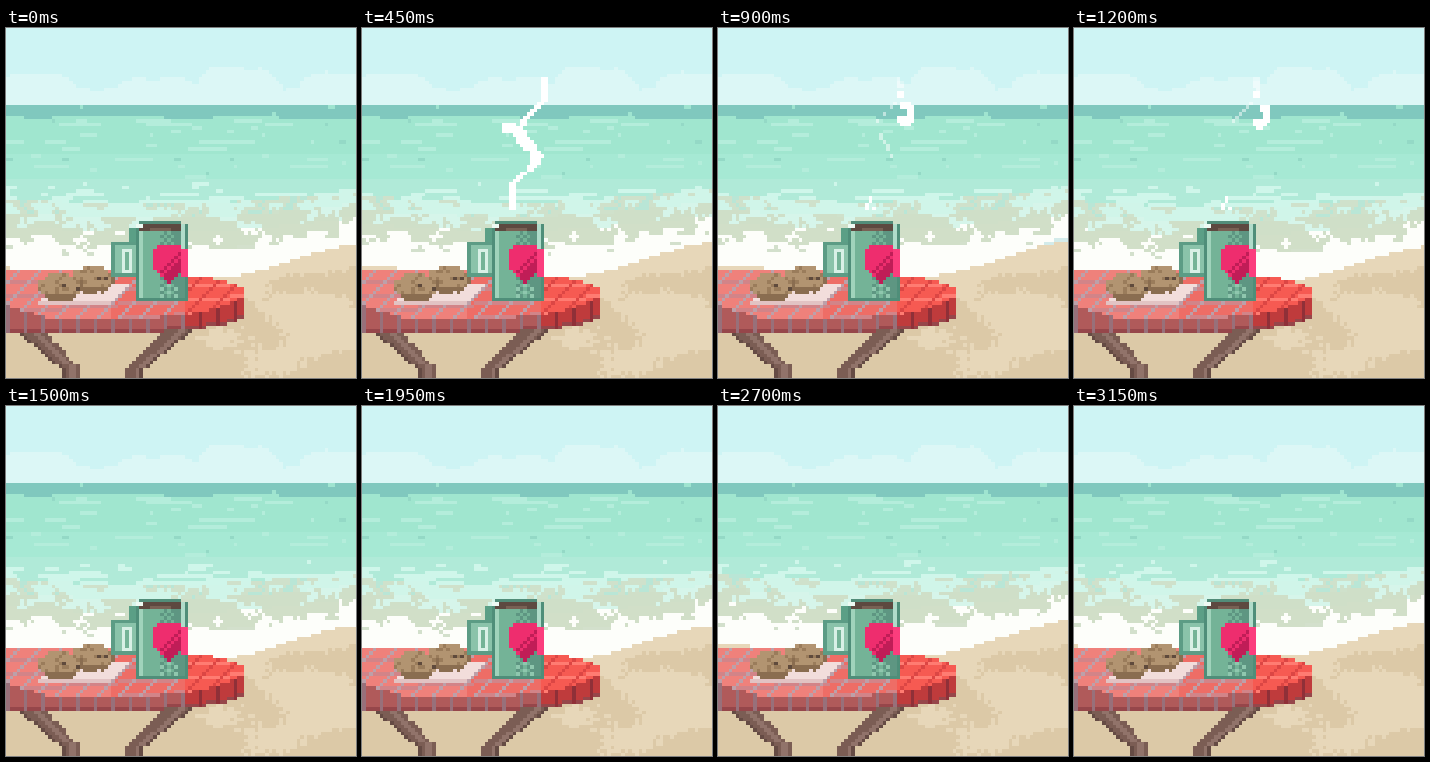
Animation, 350 px wide and 350 px high, one loop 3.3 s. Source, as an HTML page with a canvas:

```html
<!DOCTYPE html>
<html lang="en">
<head>
<meta charset="utf-8">
<title>Coffee on the beach</title>
<style>
html, body { margin: 0; width: 100%; height: 100%; overflow: hidden; background: #cef4f4; }
canvas { display: block; width: 350px; height: 350px; image-rendering: pixelated; }
</style>
</head>
<body>
<canvas id="stage" width="350" height="350"></canvas>
<script>
const N = 100, STEP = 150, LOOP = 3300;
const stage = document.getElementById('stage').getContext('2d');
const grid = document.createElement('canvas');
grid.width = grid.height = N;
const g = grid.getContext('2d');
stage.imageSmoothingEnabled = false;

function px(x, y, w, h, c) {
  g.fillStyle = c;
  g.fillRect(Math.round(x), Math.round(y), w, h);
}

function paint(x0, y0, x1, y1, pick) {
  for (let y = y0; y < y1; y++) for (let x = x0; x < x1; x++) {
    const c = pick(x, y);
    if (c) px(x, y, 1, 1, c);
  }
}

const clamp = v => Math.max(0, Math.min(1, v));
const smooth = v => (v = clamp(v), v * v * (3 - 2 * v));

function hash(x, y) {
  let n = Math.imul(x + 11, 374761393) + Math.imul(y + 7, 668265263);
  n = Math.imul(n ^ (n >>> 13), 1274126177);
  return ((n ^ (n >>> 16)) >>> 0) / 4294967296;
}

// Noise stretched sideways, so it reads as short horizontal dashes.
function dash(x, y, len) {
  const p = x / len + hash(y, 91) * 5, i = Math.floor(p), f = p - i;
  return hash(i, y) * (1 - f) + hash(i + 1, y) * f;
}

function blotch(x, y, w, h) {
  const i = Math.floor(y / h), f = y / h - i;
  return dash(x, i, w) * (1 - f) + dash(x, i + 1, w) * f;
}

// The wave runs in, pulls back, rests and returns.
function tideAt(t) {
  const ease = (a, b) => smooth((t - a) / (b - a));
  return -ease(150, 700) + 1.8 * ease(800, 1250) - 1.8 * ease(1950, 2400) + ease(2500, 2900);
}

const shoreAt = x => Math.min(68 + x * .06, 71 - 10 * smooth((x - 58) / 45));
const foamAt = x => 61 + 3 * Math.sin(Math.PI * x / N) - .025 * x;

function sky(x, y) {
  const hump = (c, w, h) => h * (1 - ((x - c) / w) ** 4);
  const rise = Math.max(hump(8, 13, 7), hump(43, 14, 5), hump(66, 14, 8), hump(95, 13, 7), 2);
  return y >= 19.5 - rise - hash(x >> 2, 5) * 1.5 ? '#dcf7f6' : '#cef4f4';
}

function deepWater(x, y) {
  const n = dash(x, y, 8);
  if (y < 25) return n > .93 ? '#9fe4d0' : '#80c8be';
  if (y === 25) return n > .5 ? '#a0e6cf' : '#80c8be';
  if (n > .84) return '#b4eddb';
  if (n < .07) return '#94d9c6';
  return y < 36 ? '#a0e6cf' : '#a6e9d4';
}

function sand(x, y) {
  const n = blotch(x, y, 16, 8) + (hash(x, y) - .5) * .14 + (y - 80) * .018;
  return n > .56 ? '#dcc9a7' : '#e7d7b9';
}

function surf(x, y, tide) {
  const left = shoreAt(x) + tide - y;
  if (left <= 0) return sand(x, y);
  if (left < 1 && x > 92 && tide < -.6) return '#d3ebea';
  const d = foamAt(x) + tide - y, row = y - Math.round(tide);
  const n = blotch(x, row, 4, 2) + (hash(x, row) - .5) * .25;
  if (d <= 0) return d > -2 && n < .3 ? '#d3e0cc' : '#fdfefa';
  if (d < 5) return n > .52 + .05 * d ? '#fdfefa' : '#d1dfc8';
  if (d < 9) return n > .72 ? '#d6f5ea' : '#cfdfc8';
  if (d < 13) return n > .5 ? '#d0f5e9' : n < .22 ? '#b9e6d6' : '#cfe1cb';
  const m = dash(x, row, 5);
  return m > 1.2 - (y - 41) * .1 ? '#cff6ea' : '#b0ead8';
}

function legs() {
  for (let y = 85; y < N; y++) {
    const k = Math.min(y - 86, 11), w = Math.round(8 - k * .25);
    for (const [x, edge] of [[3 + k * 1.15, 0], [45 - k, w - 1]]) {
      px(x, y, w, 1, '#7b5d54');
      px(x + w / 2, y, 2, 1, '#91736a');
      px(x + edge, y, 1, 1, '#654b44');
    }
  }
}

function cloth(x, y) {
  const r = x / 68;
  const hem = 82.5 - 7 * r ** 6 - Math.max(0, 12 - x) * .3;
  const foot = 86.3 - 4 * r ** 6;
  if (y < 68.7 + 5 * r ** 5 || y > foot) return null;
  const right = x > 50;
  if (y > hem) {
    if (x % 5 === 0) return right ? '#8f3038' : '#98707a';
    return y + 1 > foot ? '#96464a' : right ? '#bf3b3c' : '#b05a5a';
  }
  const across = (x + y) % 6 < 1, along = (y + (x >> 4)) % 4 === 0;
  if (right) return across ? '#dc4644' : along ? '#ff7c72' : '#f65a52';
  if (across) return '#bda0a9';
  return along ? '#d28488' : x < 30 ? '#ef817b' : '#ee6d66';
}

function napkin(x, y) {
  const slant = (79 - y) * 1.4;
  return x > 7 + slant && x < 29 + slant * .7 ? y > 77 ? '#e2c3c3' : '#f2dddb' : null;
}

function cookie(cx, cy) {
  paint(cx - 8, cy - 5, cx + 8, cy + 6, (x, y) => {
    const dx = (x - cx) / 6.6, dy = (y + .5 - cy) / 3.8, n = hash(x, y);
    if (dx * dx + dy * dy > .9 + n * .2) return null;
    if (dy > .6 || dx > .88) return '#8a6d50';
    return n > .91 ? '#5f4a3c' : n < .2 ? '#9a7c5b' : '#b29471';
  });
}

function mugBody(x, y) {
  if (x === 37 || x === 51 || y === 77) return '#4f8e79';
  if (x === 38) return '#a0d3bb';
  if (x === 50 && y < 64) return '#b0dcca';
  const shade = (x - 41) / 9;
  return shade > ((x + y) % 2 ? .3 : .75) ? '#5e9682' : '#74b397';
}

function heart(x, y) {
  const u = (x - 46) / 4.2, v = (67 - y) / 4.4;
  const q = u * u + v * v - 1;
  if (q ** 3 - u * u * v ** 3 > .05) return null;
  const dim = x - 46 + (y - 67) + (x + y) % 2 * 2 > 1;
  return dim ? '#c01d57' : '#ee2d6e';
}

function mug() {
  px(35, 57, 2, 5, '#5b9f86');
  px(30, 61, 7, 10, '#5c9c85');
  px(31, 62, 6, 8, '#8ac3aa');
  px(33, 63, 3, 7, '#d8f0e6');
  px(34, 64, 1, 5, '#74b397');
  paint(37, 56, 52, 78, mugBody);
  px(38, 55, 12, 1, '#528d79');
  px(38, 56, 12, 2, '#5d4940');
  px(41, 57, 6, 1, '#786154');
  px(37, 56, 2, 1, '#eefaf3');
  paint(41, 62, 51, 73, heart);
  px(50, 63, 2, 8, '#fb3d7d');
  paint(44, 73, 50, 77, (x, y) => (x + y * 2) % 4 < 1 ? '#8fc7ae' : null);
}

// Centre of the rising plume at height y.
function plume(y) {
  const sway = 3.2 * Math.min(1, (y - 13) / 10, (52 - y) / 12);
  return 43 + (51 - y) * .24 + sway * Math.sin((42 - y) * Math.PI / 10);
}

function steam(i) {
  if (i < 1 || i > 9) return;
  const white = '#fff', faint = 'rgba(255,255,255,.5)';
  const head = Math.max(14, 42 - 8 * i - (i > 2 ? 4 : 0));
  const tail = 51 - Math.max(0, i - 3) * 5;
  for (let y = head; y <= tail; y++) {
    const fat = 2 * Math.exp(-(((y - 36) / 4) ** 2));
    const w = i > 5 ? 1 : Math.round(1.6 + fat);
    if (i < 6 || hash(y, i) > .4) px(plume(y) - w / 2, y, w, 1, i < 6 ? white : faint);
  }

  // Side branch, folding back into the plume.
  if (i > 1 && i < 5) {
    for (let s = 0; s < 7 - (i - 2); s++) px(46 - s * .8, 33 - s, 2, 2, white);
    if (i < 4) px(40, 27, 4, 3, white);
  }

  // Curl that rolls up beside the head and fades.
  if (i > 3) {
    for (let a = -2.6 + (i - 4) * .4; a < 2.4; a += .3) {
      px(52 + 2 * Math.cos(a), 22.5 + (i - 4) * .4 + 2.5 * Math.sin(a), 2, 2, white);
    }
    px(51, 18, 2, i < 6 ? 3 : 2, white);
    px(51, 14, 1, 3, i < 6 ? white : faint);
    px(43, 48, 1, 2, white);
    px(42, 50, 1, 2, white);
    px(44, 51, 1, 1, white);
  }
}

function draw(i) {
  const tide = tideAt(i * STEP);
  paint(0, 0, N, 22, sky);
  paint(0, 22, N, 43, deepWater);
  paint(0, 43, N, 74, (x, y) => surf(x, y, tide));
  paint(0, 74, N, N, sand);
  legs();
  paint(0, 68, 68, 88, cloth);
  paint(0, 73, N, 79, napkin);
  cookie(24, 72);
  cookie(15, 74);
  mug();
  steam(i);
  stage.drawImage(grid, 0, 0, 350, 350);
}

let shown = -1;
function tick(now) {
  const i = Math.floor(now % LOOP / STEP);
  if (i !== shown) draw(shown = i);
  requestAnimationFrame(tick);
}
tick(0);
</script>
</body>
</html>
```
